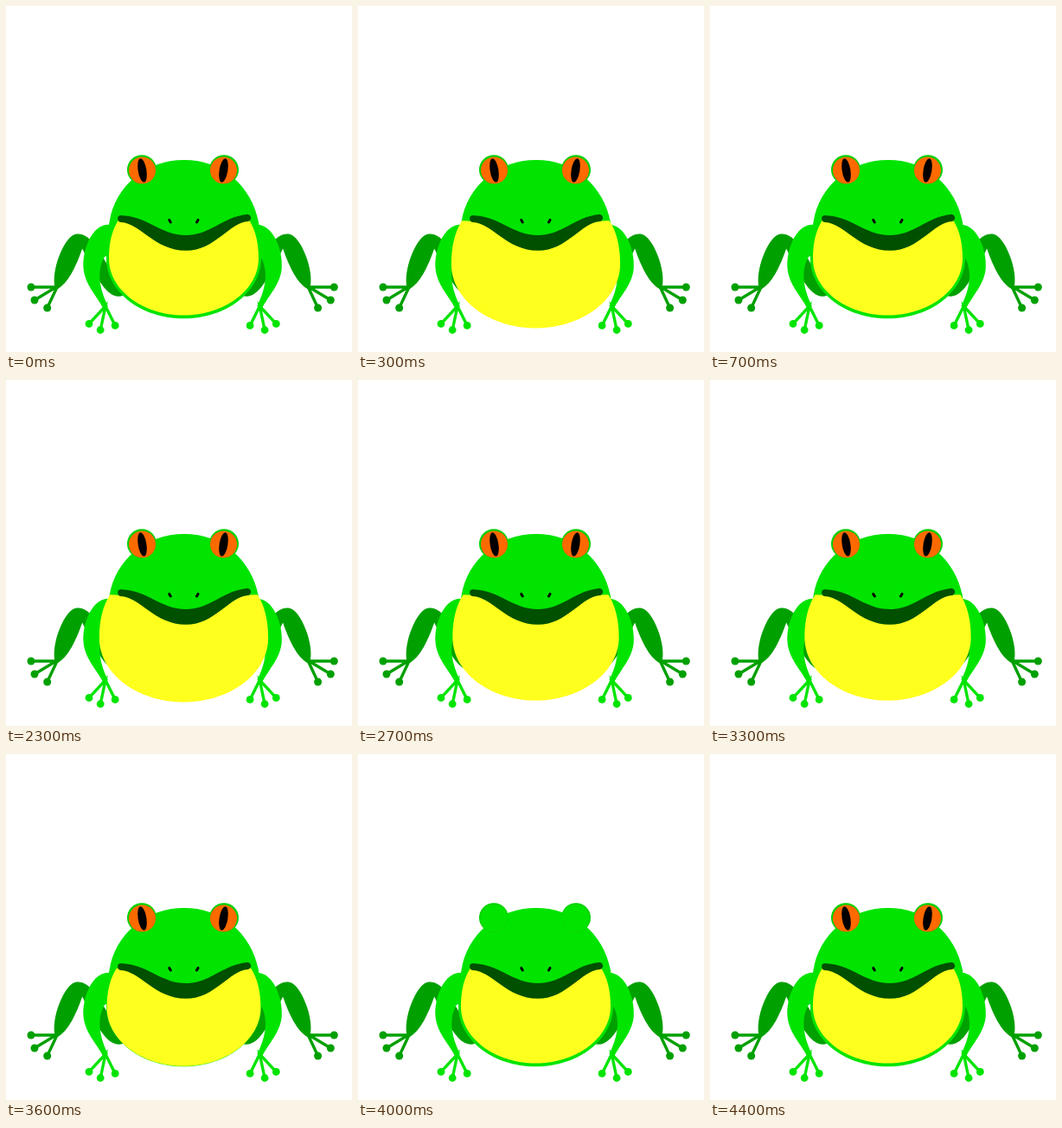
An HTML page that plays this animation: 400 px wide and 400 px high, repeating every 5400 ms.

```html
<!DOCTYPE html>
<html lang="en">
<head>
<meta charset="utf-8">
<title>Frog</title>
<style>
  html, body { margin: 0; width: 100%; height: 100%; overflow: hidden; background: #fff; }
  svg { display: block; width: 100%; height: 100%; }
  .skin { fill: #00e400; }
  .dark { fill: #00a000; }
  .toes { fill: none; stroke-width: 3.4; stroke-linecap: round; }
</style>
</head>
<body>
<svg viewBox="0 0 400 400">
  <defs>
    <clipPath id="eyeClip"><circle r="15.9"/></clipPath>
    <g id="legs">
      <g class="dark">
        <path d="M80 264C95 262 115 288 135 335C119 340 107 320 88 280Z"/>
        <path d="M57 327C51 306 68 266 80 264C88 262 96 268 99 272L88 281C81 301 72 320 60 327Z"/>
        <circle cx="29" cy="325" r="4.5"/>
        <circle cx="33" cy="340" r="4.5"/>
        <circle cx="47.7" cy="349" r="4.5"/>
      </g>
      <path class="toes" stroke="#00a000" d="M29 325L58 325L33 340M59 325L47.7 349"/>
      <g class="skin">
        <path d="M122 253C101 249 88 280 89.5 303C91 322 105 335 112 349L118 347C107 325 105 305 114 290L124 285Z"/>
        <circle cx="96" cy="367.4" r="4.4"/>
        <circle cx="109.2" cy="374.5" r="4.4"/>
        <circle cx="126.2" cy="369.4" r="4.4"/>
      </g>
      <path class="toes" stroke="#00e400" d="M96 367.4L115 347L109.2 374.5M115 347L126.2 369.4"/>
    </g>
    <g id="eye">
      <circle r="15.5" fill="#ff6a00"/>
      <ellipse rx="4.9" ry="14" transform="rotate(-9)"/>
    </g>
  </defs>

  <use href="#legs"/>
  <use href="#legs" transform="matrix(-1 0 0 1 408.3 0)"/>
  <path class="skin" d="M206 178C162 178 126 208 119.5 250C117 265 116 280 116 292C116 330 156 361.3 205.5 361.3C255 361.3 295 330 295 292C295 280 294 265 292 250C284 208 250 178 206 178Z"/>
  <path id="throat" fill="#ffff1e" d="M119 292C119 273 123 258 130 247.5C160 247 176 270 206 270C236 270 252 246 281 247.5C288 258 292 273 292 292C292 328 253 357.5 205.5 357.5C158 357.5 119 328 119 292Z"/>
  <path fill="#005000" d="M132 242C165 243 178 265 208 265C236 265 250 244 278 241A4.1 4.1 0 0 1 280 249C258 250 242 282.8 208 282.8C172 282.8 155 251 133 250A4.1 4.1 0 0 1 132 242Z"/>
  <path fill="none" stroke="#000" stroke-width="3" stroke-linecap="round" d="M188.8 247.4L190.3 250M222 247.4L220.5 250"/>

  <g fill="#00d200">
    <circle cx="157" cy="189.2" r="17"/>
    <circle cx="252" cy="189.2" r="17"/>
  </g>
  <g transform="translate(157.5 190)">
    <use href="#eye"/>
    <g clip-path="url(#eyeClip)"><rect class="lid skin" x="-17" y="-16" width="34" height="0"/></g>
  </g>
  <g transform="translate(251.5 190) scale(-1 1)">
    <use href="#eye"/>
    <g clip-path="url(#eyeClip)"><rect class="lid skin" x="-17" y="-16" width="34" height="0"/></g>
  </g>
</svg>
<script>
  const LOOP = 5400, STEP = 100;
  const throat = document.getElementById('throat');
  const lids = document.querySelectorAll('.lid');

  // Each key is [time in ms, amount].
  const puffKeys = [
    [0, 0], [100, 1], [600, 1 / 7], [700, 0], [2200, 0], [2300, 0.66],
    [2400, 1], [2800, 3 / 7], [3000, 1], [3700, 0], [LOOP, 0]
  ];
  const blinkKeys = [[0, 0], [3700, 0], [4000, 1], [4400, 0], [LOOP, 0]];

  function valueAt(keys, t) {
    const i = keys.findIndex(key => key[0] > t);
    const [t0, v0] = keys[i - 1], [t1, v1] = keys[i];
    return v0 + (v1 - v0) * (t - t0) / (t1 - t0);
  }

  function draw(ms) {
    const t = Math.floor((ms % LOOP) / STEP) * STEP;
    const scale = 1 + 0.195 * valueAt(puffKeys, t);
    throat.setAttribute('transform',
      `translate(205.5 241) scale(${scale}) translate(-205.5 -241)`);
    const drop = 32 * valueAt(blinkKeys, t);
    lids.forEach(lid => lid.setAttribute('height', drop));
  }

  const start = performance.now();
  function tick() {
    draw(performance.now() - start);
    requestAnimationFrame(tick);
  }
  tick();
</script>
</body>
</html>
```
